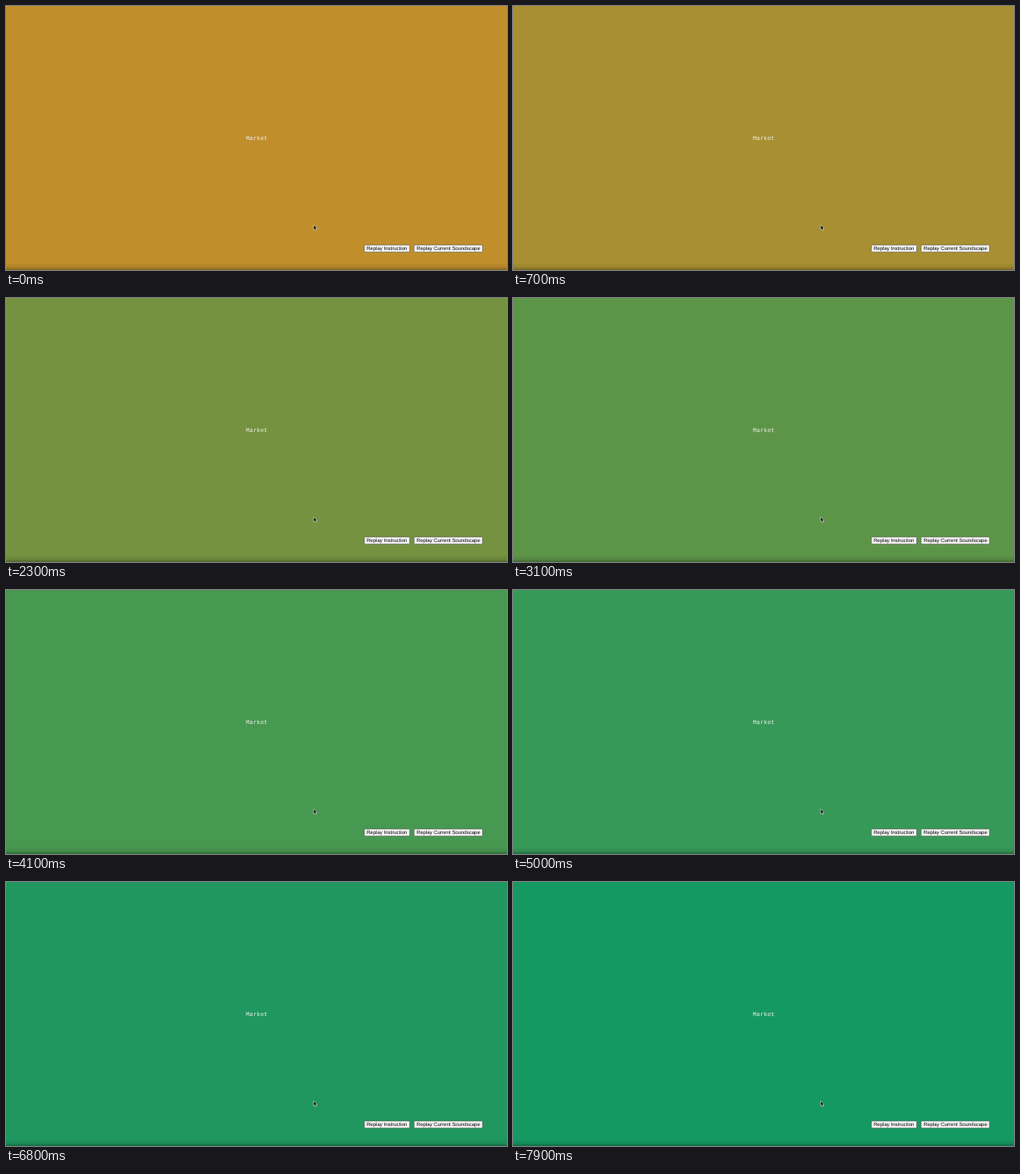
These frames come from a looping animation (600x317 px, 8000 ms). An HTML page:

```html
<!DOCTYPE html>
<html lang="en">
<head>
<meta charset="utf-8">
<title>Market</title>
<style>
  html, body { margin: 0; width: 100%; height: 100%; overflow: hidden; }
  body { background: rgb(192, 142, 43); }
  svg { display: block; width: 600px; height: 317px; }
  text { text-anchor: middle; text-rendering: geometricPrecision; cursor: default; }
  .word { font: 7.3px "Liberation Mono", "Courier New", monospace; fill: #ecece6; }
  .button rect { fill: #f5f5f5; stroke: #55564e; stroke-width: .6; }
  .button text { font: 6.05px "Liberation Sans", Arial, sans-serif; fill: #000; }
</style>
</head>
<body>
<svg viewBox="0 0 600 317">
  <defs>
    <linearGradient id="shade" x1="0" y1="0" x2="0" y2="1">
      <stop offset="0" stop-opacity="0"/>
      <stop offset=".6" stop-opacity=".08"/>
      <stop offset="1" stop-opacity=".3"/>
    </linearGradient>
  </defs>
  <rect id="back" width="600" height="317"/>
  <rect y="308" width="600" height="9" fill="url(#shade)"/>
  <text class="word" x="300.3" y="161.3">Market</text>
  <g class="button">
    <rect x="429.2" y="287" width="54.2" height="8.4" rx=".4"/>
    <text x="456.2" y="293.2">Replay Instruction</text>
  </g>
  <g class="button">
    <rect x="488.8" y="287" width="81.9" height="8.4" rx=".4"/>
    <text x="529.8" y="293.2">Replay Current Soundscape</text>
  </g>
  <path d="M368.3 262.8v6.1l1.4-1.2 1 2.2 1.1-.5-1-2.1h1.8z"
        fill="#000" stroke="#e8e8e8" stroke-width=".6" stroke-linejoin="round"/>
</svg>
<script>
  const LOOP = 8000, STEP = 100;

  // time in ms, red, green, blue
  const keys = [
    [0, 192, 142, 43],
    [1400, 144, 144, 55],
    [2300, 116, 146, 64],
    [3100, 93, 149, 72],
    [5000, 54, 153, 88],
    [6800, 31, 151, 95],
    [7900, 21, 153, 99]
  ];
  const back = document.getElementById('back');

  function slope(i, c) {
    const a = keys[Math.max(i - 1, 0)];
    const b = keys[Math.min(i + 1, keys.length - 1)];
    return (b[c] - a[c]) / (b[0] - a[0]);
  }

  // Smooth cubic curve through the colour keys
  function channel(t, c) {
    let i = 0;
    while (i < keys.length - 2 && t >= keys[i + 1][0]) i++;
    const [a, b] = [keys[i], keys[i + 1]];
    const d = b[0] - a[0], u = (t - a[0]) / d, v = 1 - u;
    return Math.round(
      (1 + 2 * u) * v * v * a[c] + u * v * v * d * slope(i, c) +
      u * u * (3 - 2 * u) * b[c] - u * u * v * d * slope(i + 1, c));
  }

  function draw(now) {
    let t = Math.floor((now % LOOP) / STEP) * STEP;
    if (t > 7100 && t < 7400) t = 7100; // short hold
    back.setAttribute('fill', `rgb(${[1, 2, 3].map(c => channel(t, c))})`);
  }

  const start = performance.now();
  function tick() {
    draw(performance.now() - start);
    requestAnimationFrame(tick);
  }
  tick();
</script>
</body>
</html>
```
